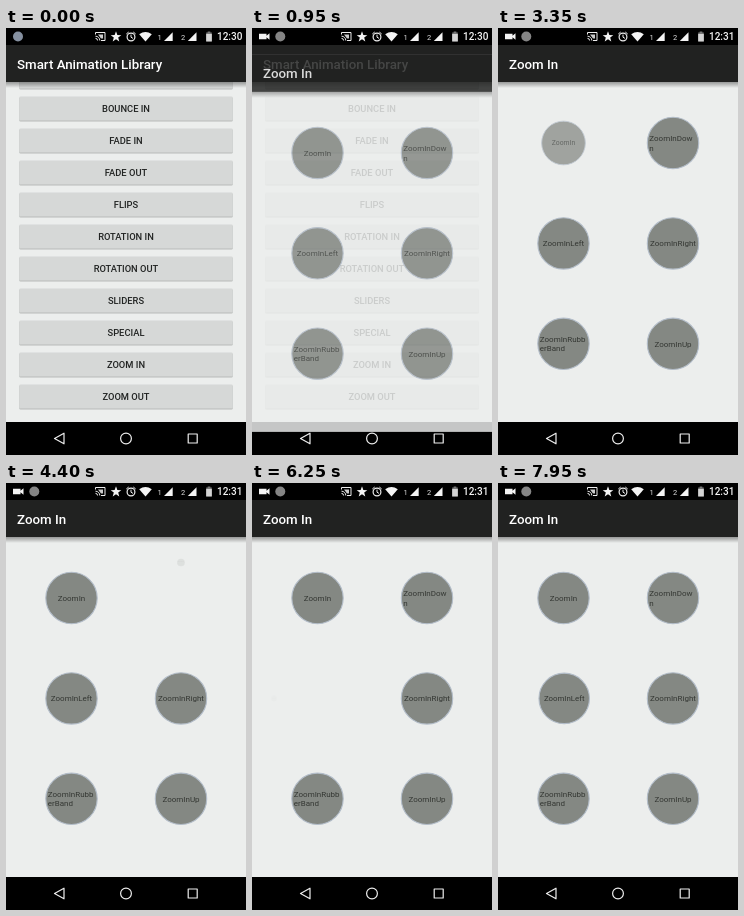
Write an HTML page that moves like this. It is 240 px wide and 427 px high and loops after 8000 ms.

```html
<!DOCTYPE html>
<html lang="en">
<head>
<meta charset="utf-8">
<title>Animation library demo</title>
<style>
  html, body { margin: 0; width: 100%; height: 100%; overflow: hidden; background: #000; }
  svg { display: block; width: 100%; height: 100%; font-family: Roboto, sans-serif; }
  .title { font-size: 13.33px; font-weight: 500; fill: #fff; }
  .item { font-size: 9.33px; font-weight: 500; fill: #222423; text-anchor: middle; }
  .label { font-size: 8px; fill: #343733; }
  .status { font-size: 10px; font-weight: 500; fill: #f4f4f4; }
  .sim { font-size: 7.5px; fill: #ddd; }
</style>
</head>
<body>
<svg viewBox="0 0 240 427">
  <defs>
    <linearGradient id="shade" x1="0" y1="0" x2="0" y2="1">
      <stop offset="0" stop-color="#000" stop-opacity=".36"/>
      <stop offset="1" stop-color="#000" stop-opacity="0"/>
    </linearGradient>
    <g id="bar">
      <rect y="54" width="240" height="6" fill="url(#shade)"/>
      <rect y="17" width="240" height="37" fill="#212221"/>
    </g>
    <clipPath id="stage"><rect y="17" width="240" height="377"/></clipPath>
  </defs>
  <rect width="240" height="427"/>

  <g clip-path="url(#stage)">
    <rect y="17" width="240" height="377" fill="#eceeed"/>
    <g id="list"></g>
    <use href="#bar"/>
    <text class="title" x="11" y="40.5">Smart Animation Library</text>
  </g>

  <g id="screen">
    <rect y="17" width="240" height="377" fill="#eceeed"/>
    <g id="buttons"></g>
    <use href="#bar"/>
    <text class="title" x="11" y="40.5">Zoom In</text>
  </g>

  <g fill="none" stroke="#eee" stroke-width="1.2" stroke-linejoin="round">
    <path d="M58 405.2V415.8L48.5 410.5Z"/>
    <circle cx="120" cy="410.5" r="5.4"/>
    <rect x="182.2" y="406" width="9" height="9"/>
  </g>

  <rect width="240" height="17"/>
  <circle id="badge" cy="8.5" r="5" fill="#8590a0"/>
  <path id="camera" d="M7 5.8H14.5V7.7L17.5 5.3V11.7L14.5 9.3V11.2H7Z" fill="#f4f4f4"/>
  <g fill="none" stroke="#eee" stroke-width="1">
    <path d="M89.5 6.5V4.5H99V12.5H95M89.5 8.2A4.3 4.3 0 0 1 93.8 12.5M89.5 10.4A2.1 2.1 0 0 1 91.6 12.5"/>
    <path d="M92 6.5H97V10.5H95Z" fill="#ccc" stroke="none"/>
    <circle cx="125" cy="9" r="3.9" stroke-width="1.2"/>
    <path d="M125 6.6V9.2L127 10.4M120.3 6L122.7 4M129.7 6L127.3 4"/>
  </g>
  <g fill="#f4f4f4">
    <path id="star"/>
    <path d="M133.2 6.2Q139.5 1.6 145.8 6.2L139.5 13.6Z"/>
    <path d="M166.7 4.3V13H158Z"/>
    <path d="M190.5 4.3V13H181.8Z"/>
    <path d="M200.2 4.6H201.7V3.6H204.3V4.6H205.8V13.4H200.2Z" fill="#777"/>
    <rect x="200.2" y="6" width="5.6" height="7.4" fill="#d4d4d4"/>
  </g>
  <text class="sim" x="151.5" y="11.5">1</text>
  <text class="sim" x="175" y="11.5">2</text>
  <text class="status" id="clock" x="211" y="12.2">12:30</text>
</svg>
<script>
const LOOP = 8000;
const PX = 427 / 960; // stage pixels per device pixel
const $ = id => document.getElementById(id);

function add(parent, tag, attrs, text) {
  const el = document.createElementNS('http://www.w3.org/2000/svg', tag);
  for (const key in attrs) el.setAttribute(key, attrs[key]);
  if (text) el.textContent = text;
  parent.append(el);
  return el;
}

const items = ['', 'BOUNCE IN', 'FADE IN', 'FADE OUT', 'FLIPS', 'ROTATION IN',
  'ROTATION OUT', 'SLIDERS', 'SPECIAL', 'ZOOM IN', 'ZOOM OUT'];
items.forEach((name, i) => {
  const y = 48.5 + 32 * i;
  const box = { x: 13.3, width: 213.4, height: 24, rx: 1 };
  add($('list'), 'rect', { ...box, y: y - 11, fill: '#b9bcba' });
  add($('list'), 'rect', { ...box, y: y - 12, fill: '#d6d8d7' });
  add($('list'), 'text', { class: 'item', x: 120, y: y + 3.5 }, name);
});

const buttons = [['ZoomIn'], ['ZoomInDow', 'n'], ['ZoomInLeft'],
  ['ZoomInRight'], ['ZoomInRubb', 'erBand'], ['ZoomInUp']].map((lines, i) => {
  const x = i % 2 ? 175 : 65.5;
  const y = 115 + 100.4 * Math.floor(i / 2);
  const el = add($('buttons'), 'g', {});
  add(el, 'circle', { r: 25.7, fill: '#848883', stroke: '#b3bdc9', 'stroke-width': 1.1 });
  const wrapped = lines.length > 1;
  lines.forEach((line, n) => add(el, 'text', {
    class: 'label',
    x: wrapped ? -23.7 : 0,
    y: wrapped ? -1.7 + 9.4 * n : 2.9,
    'text-anchor': wrapped ? 'start' : 'middle'
  }, line));
  return { el, x, y };
});

const starPoints = Array.from({ length: 10 }, (_, i) => {
  const r = i % 2 ? 2.3 : 5.6, a = i * Math.PI / 5;
  return `${110 + r * Math.sin(a)} ${8.9 - r * Math.cos(a)}`;
});
$('star').setAttribute('d', `M${starPoints.join('L')}Z`);

const progress = (t, start, length) => Math.min(1, Math.max(0, (t - start) / length));
const smooth = p => (1 - Math.cos(Math.PI * p)) / 2;
const decelerate = (p, power) => 1 - (1 - p) ** power;
const between = (a, b, p) => a + (b - a) * p;
const keys = (a, b, c, p) => p < .5 ? between(a, b, p * 2) : between(b, c, p * 2 - 1);

function pose(index, scale = 1, alpha = 1, dx = 0, dy = 0) {
  const { el, x, y } = buttons[index];
  el.setAttribute('transform', `translate(${x + dx} ${y + dy}) scale(${scale})`);
  el.setAttribute('opacity', alpha);
}

function zoom(t, start) {
  if (t < start) return { scale: 1, alpha: 1, shift: () => 0 };
  const p = smooth(progress(t, start, 2000));
  return {
    scale: keys(.1, .475, 1, p),
    alpha: keys(0, 1, 1, p),
    shift: overshoot => keys(-45, overshoot * PX, 0, p)
  };
}

function draw(t) {
  const arrive = smooth(progress(t, 50, 450));
  $('camera').setAttribute('opacity', arrive);
  $('badge').setAttribute('cx', between(12, 28.3, arrive));
  $('badge').setAttribute('fill', t < 500 ? '#8590a0' : '#858585');
  $('clock').textContent = t < 1600 ? '12:30' : '12:31';

  const rise = 34 * (1 - decelerate(progress(t, 800, 690), 5));
  $('screen').setAttribute('transform', `translate(0 ${rise})`);
  $('screen').setAttribute('opacity', decelerate(progress(t, 800, 255), 2));

  const fade = t < 1800 ? 1 : smooth(progress(t, 2050, 2000));
  pose(0, between(.45, 1, fade), fade);
  const down = zoom(t, 4070);
  pose(1, down.scale, down.alpha, 0, down.shift(60));
  const left = zoom(t, 6115);
  pose(2, left.scale, left.alpha, left.shift(48), 0);
}

[3, 4, 5].forEach(i => pose(i));
draw(0);
const begin = performance.now();
(function tick() {
  draw((performance.now() - begin) % LOOP);
  requestAnimationFrame(tick);
})();
</script>
</body>
</html>
```
